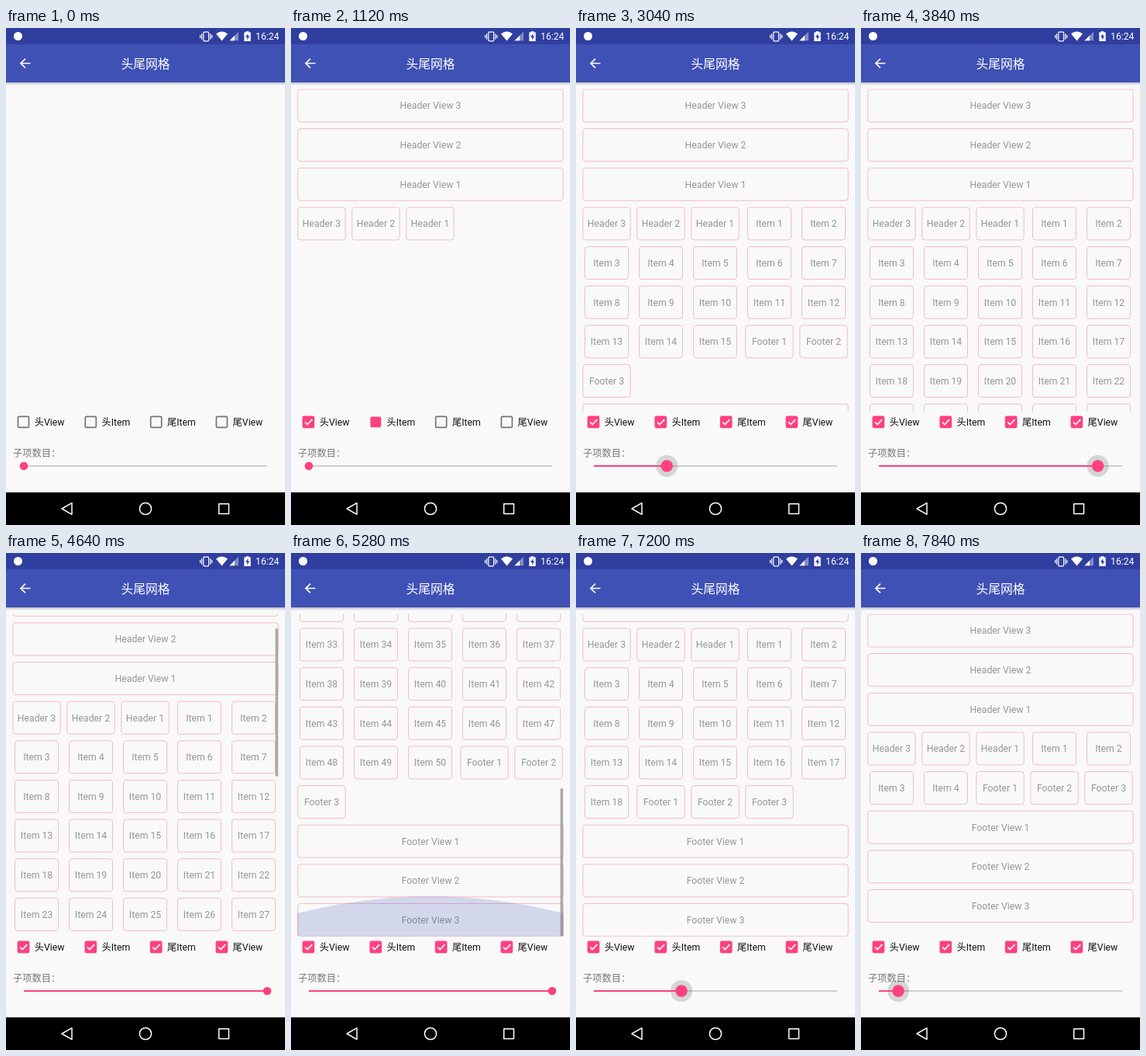
Animation, 360 px wide and 640 px high, one loop 8 s. Source, as an HTML page:

```html
<!DOCTYPE html>
<html lang="zh">
<head>
<meta charset="utf-8">
<title>头尾网格</title>
<style>
html, body { margin: 0; width: 100%; height: 100%; overflow: hidden; background: #f9f9f9; }
svg { display: block; width: 360px; height: 640px; }
text { font: 12.25px Roboto, "Noto Sans CJK SC", "Noto Sans CJK", sans-serif; }
.cell rect { fill: none; stroke: #f3b3c6; stroke-width: .9; }
.cell text { fill: #969696; text-anchor: middle; }
</style>
</head>
<body>
<svg viewBox="0 0 360 640" xmlns="http://www.w3.org/2000/svg">
  <defs>
    <clipPath id="view"><rect x="8" y="78.4" width="344" height="415.4"/></clipPath>
    <linearGradient id="shade" x2="0" y2="1">
      <stop offset="0" stop-color="#000" stop-opacity=".24"/>
      <stop offset="1" stop-color="#000" stop-opacity="0"/>
    </linearGradient>
  </defs>
  <rect width="360" height="640" fill="#f9f9f9"/>

  <g clip-path="url(#view)">
    <g id="list"></g>
    <path id="glow" fill="#3f51b5"/>
    <rect id="bar" x="347.5" width="3.6" fill="#7d7d7d"/>
  </g>

  <rect y="70" width="360" height="4" fill="url(#shade)"/>
  <rect width="360" height="70" fill="#3f51b5"/>
  <rect width="360" height="21" fill="#303f9f"/>
  <text x="180" y="51.7" fill="#fff" text-anchor="middle" style="font-size:15.75px">头尾网格</text>
  <path d="M31.5 45.5H19.5M25 39.6L19 45.5L25 51.4" fill="none" stroke="#fff" stroke-width="1.7"/>

  <g fill="#fff">
    <circle cx="15.5" cy="10.5" r="5.5"/>
    <path d="M271 7.4Q278.5 1.8 286 7.4L278.5 16.4Z"/>
    <path d="M288.5 16.2H300V4.7Z" opacity=".4"/>
    <path d="M288.5 16.2H295V9.7Z"/>
    <path d="M307.3 5.6H309.6V4.3H313.4V5.6H315.7V17H307.3Z"/>
    <path d="M312.3 7L309 12H311.2V15.6L314.2 10.4H312.3Z" fill="#303f9f"/>
    <text x="322" y="15">16:24</text>
  </g>
  <g fill="none" stroke="#fff" stroke-width="1.2">
    <rect x="254.8" y="5.2" width="6.8" height="11.6" rx="1"/>
    <path d="M252.6 7.2V14.8M250.6 9V13M263.8 7.2V14.8M265.8 9V13"/>
  </g>

  <g id="checks"></g>

  <text x="9" y="552" fill="#777">子项数目：</text>
  <path d="M23 564H337" stroke="#cfcfcf" stroke-width="1.8"/>
  <circle id="halo" cy="564" r="14" fill="#000"/>
  <path id="fill" stroke="#ff4081" stroke-width="1.9"/>
  <circle id="thumb" cy="564" fill="#ff4081"/>

  <rect y="598" width="360" height="42"/>
  <g fill="none" stroke="#fff" stroke-width="1.5" stroke-linejoin="round">
    <path d="M72 619L85 611.7V626.3Z"/>
    <circle cx="180" cy="619" r="7.6"/>
    <rect x="274.7" y="612.7" width="12.8" height="12.8"/>
  </g>
</svg>
<script>
const LOOP = 8000, TOP = 79, BOTTOM = 493.5, PITCH = 50.64, BOX = 42;
const TAPS = [
  { x: 22.5, label: '头View', at: 340 },
  { x: 109.3, label: '头Item', at: 970 },
  { x: 193.7, label: '尾Item', at: 1600 },
  { x: 278.4, label: '尾View', at: 2230 }
];
const COUNT = [[2620, 0], [2900, 9], [3360, 30], [3840, 45], [4160, 50],
               [5720, 50], [6240, 40], [7840, 4], [8000, 2]];
const SCROLL = [[4520, 0], [4640, 39], [4760, 130], [4960, 330], [5140, 489]];
const PRESSES = [[2520, 4260], [5600, 8400]];

const $ = id => document.getElementById(id);
const set = (el, attrs) => { for (const k in attrs) el.setAttribute(k, attrs[k]); };
const clamp = v => Math.max(0, Math.min(1, v));
const ramp = (t, a, b) => clamp((t - a) / (b - a));

function track(keys, t) {
  let v = keys[0][1];
  for (let i = 1; i < keys.length; i++) {
    const [a, from] = keys[i - 1], [b, to] = keys[i];
    if (t >= a) v = from + (to - from) * ramp(t, a, b);
  }
  return v;
}

$('checks').innerHTML = TAPS.map(c => `
  <g transform="translate(${c.x} 507.3)">
    <circle class="ripple" r="17" fill="#000"/>
    <rect class="box" x="-7" y="-7" width="14" height="14" rx="1.4" stroke-width="1.7"/>
    <path class="mark" d="M-4.4 .2L-1.4 3.3L4.8 -3.2" fill="none" stroke="#fff" stroke-width="1.7"/>
    <text x="14.2" y="4.6" fill="#111">${c.label}</text>
  </g>`).join('');
const checks = [...$('checks').children].map(g => ({
  ripple: g.querySelector('.ripple'), box: g.querySelector('.box'), mark: g.querySelector('.mark')
}));

function cell(cx, row, w, label) {
  const y = TOP + row * PITCH;
  return `<g class="cell"><rect x="${cx - w / 2}" y="${y}" width="${w}" height="${BOX}" rx="3.5"/>` +
    `<text x="${cx}" y="${y + 25.4}">${label}</text></g>`;
}

let shown = '', rows = 0;
function buildList(on, n) {
  const key = on + '/' + n;
  if (key === shown) return;
  shown = key;
  const grid = [];
  const add = (name, i, w) => grid.push([name + ' ' + i, w]);
  if (on[1]) for (let i = 3; i > 0; i--) add('Header', i, 61.4);
  for (let i = 1; i <= n; i++) add('Item', i, 56);
  if (on[2]) for (let i = 1; i < 4; i++) add('Footer', i, 61.4);

  let html = '';
  rows = 0;
  const wide = label => { html += cell(180, rows++, 342.4, label); };
  if (on[0]) for (let i = 3; i > 0; i--) wide('Header View ' + i);
  grid.forEach(([label, w], i) => {
    html += cell(39.5 + i % 5 * 70, rows + Math.floor(i / 5), w, label);
  });
  rows += Math.ceil(grid.length / 5);
  if (on[3]) for (let i = 1; i < 4; i++) wide('Footer View ' + i);
  $('list').innerHTML = html;
}

function drawCheck(el, t) {
  const on = t >= 0;
  const dip = 1 - .12 * Math.sin(Math.PI * ramp(t, 0, 310));
  const grow = ramp(t, 130, 310);
  set(el.ripple, { opacity: .1 * ramp(t, -110, -20) * (1 - ramp(t, 0, 150)) });
  set(el.box, {
    fill: on ? '#ff4081' : '#ff408100',
    'fill-opacity': ramp(t, 0, 110),
    stroke: on ? '#ff4081' : '#757575',
    transform: `scale(${dip})`
  });
  set(el.mark, {
    opacity: grow > 0 ? 1 : 0,
    transform: `translate(${-1.4 * (1 - grow)} ${2.4 * (1 - grow)}) scale(${grow})`
  });
}

function drawScroll(t) {
  const view = BOTTOM - TOP;
  const total = Math.max(view, (rows - 1) * PITCH + BOX);
  const max = total - view;
  const y = Math.min(max, track(SCROLL, t));
  set($('list'), { transform: `translate(0 ${-y})` });

  const len = view * view / total;
  set($('bar'), {
    y: TOP + (max ? y / max * (view - len) : 0),
    height: len,
    opacity: .62 * ramp(t, 4520, 4560) * (1 - ramp(t, 5480, 5730))
  });

  const rise = ramp(t, 5140, 5270) * (1 - ramp(t, 5300, 5800));
  const edge = BOTTOM - 29.5 * rise, peak = BOTTOM - 73 * rise;
  set($('glow'), {
    d: `M8 ${BOTTOM}V${edge}Q180 ${peak} 352 ${edge}V${BOTTOM}Z`,
    opacity: .2 * Math.sqrt(rise)
  });
}

function drawSlider(t, n) {
  const x = 23 + n * 6.28;
  const press = Math.max(...PRESSES.map(([a, b]) => ramp(t, a, a + 150) * (1 - ramp(t, b, b + 180))));
  set($('halo'), { cx: x, opacity: .14 * press });
  set($('fill'), { d: `M23 564H${x}` });
  set($('thumb'), { cx: x, r: 5.3 + 2.4 * press });
}

function draw(t) {
  const n = Math.round(track(COUNT, t));
  buildList(TAPS.map(c => t >= c.at ? 1 : 0), n);
  checks.forEach((el, i) => drawCheck(el, t - TAPS[i].at));
  drawScroll(t);
  drawSlider(t, n);
}

const start = performance.now();
function tick() {
  draw((performance.now() - start) % LOOP);
  requestAnimationFrame(tick);
}
tick();
</script>
</body>
</html>
```
